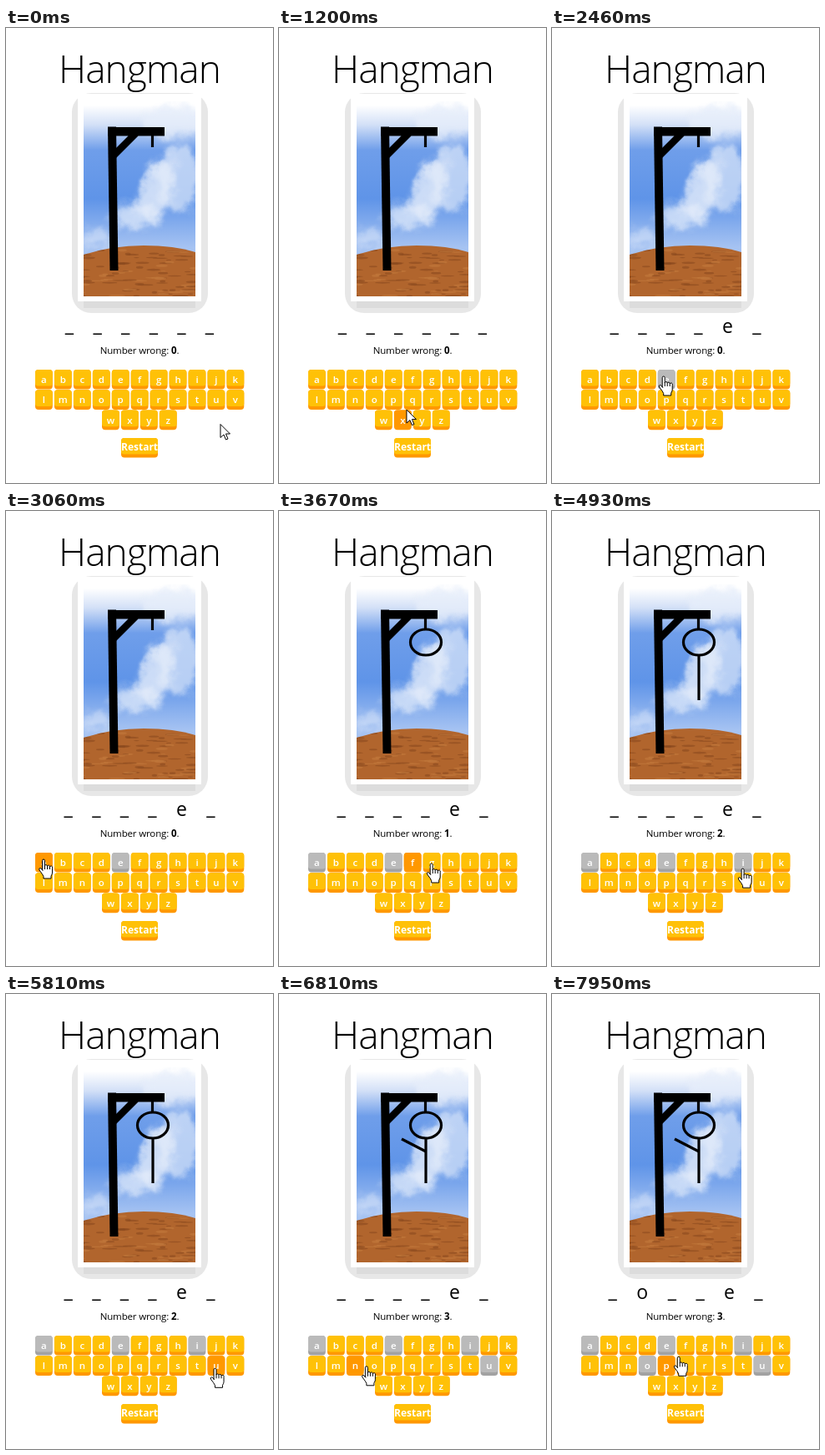
Animation, 320 px wide and 546 px high, one loop 8 s. Source, as an HTML page:

```html
<!DOCTYPE html>
<html lang="en">
<head>
<meta charset="utf-8">
<title>Hangman</title>
<style>
  html, body { margin: 0; width: 100%; height: 100%; overflow: hidden; background: #fff; }
  svg { display: block; font-family: "Open Sans", "Noto Sans", sans-serif; }
  text { text-anchor: middle; white-space: pre; }
  .base { fill: #ff9800; }
  .face { fill: #ffc107; }
  .key text { fill: #fff; font-size: 11.5px; font-weight: 600; }
  .key.restart text { font-size: 12px; font-weight: 700; }
  .hover .face { fill: #ff9800; }
  .used .base { fill: #a2a2a2; }
  .used .face { fill: #bababa; }
  .pointer path { fill: #fff; stroke: #000; }
  .man { fill: none; stroke: #000; stroke-width: 3.2; }
</style>
</head>
<body>
<svg width="320" height="546" viewBox="0 0 320 546">
  <defs>
    <linearGradient id="sky" x1="0" y1="0" x2="0" y2="1">
      <stop offset="0.02" stop-color="#fff"/>
      <stop offset="0.12" stop-color="#d3e0f7"/>
      <stop offset="0.25" stop-color="#6f9eea"/>
      <stop offset="0.5" stop-color="#5f94e8"/>
      <stop offset="0.75" stop-color="#a6c3f2"/>
    </linearGradient>
    <filter id="cloud" x="-30%" y="-30%" width="160%" height="160%" color-interpolation-filters="sRGB">
      <feTurbulence type="fractalNoise" baseFrequency=".05" numOctaves="3" seed="4" result="noise"/>
      <feGaussianBlur in="SourceGraphic" stdDeviation="4"/>
      <feDisplacementMap in2="noise" scale="22" xChannelSelector="R" yChannelSelector="G"/>
    </filter>
    <clipPath id="photo"><rect x="93" y="88" width="134" height="234"/></clipPath>
    <clipPath id="hill"><path d="M93 272Q128 261 165 261T227 269V322H93Z"/></clipPath>
  </defs>
  <text x="160" y="65.5" font-size="46" font-weight="300" letter-spacing="-1">Hangman</text>
  <rect x="79" y="78" width="163" height="264" rx="23" fill="#e7e7e7"/>
  <rect x="93" y="328" width="134" height="8" fill="#dcdcdc"/>
  <rect x="86" y="79" width="148" height="249" fill="#fff"/>
  <g clip-path="url(#photo)">
    <rect x="93" y="88" width="134" height="234" fill="url(#sky)"/>
    <g filter="url(#cloud)" fill="#e6eefb">
      <ellipse cx="205" cy="112" rx="42" ry="18" opacity=".8"/>
      <ellipse cx="207" cy="180" rx="27" ry="40" opacity=".65"/>
      <ellipse cx="180" cy="195" rx="18" ry="40" transform="rotate(24 180 195)" opacity=".8"/>
      <ellipse cx="158" cy="226" rx="30" ry="16" opacity=".7"/>
      <ellipse cx="108" cy="252" rx="20" ry="10" opacity=".5"/>
    </g>
    <g id="soil" clip-path="url(#hill)"><rect x="93" y="258" width="134" height="64" fill="#b1652d"/></g>
  </g>
  <path d="M122 118.5H132L134.500 291H124.500Z"/>
  <path d="M122 119H190V129.500H122ZM130 158V146L147 129H159Z"/>
  <path class="man" d="M175.500 128V143"/>
  <ellipse class="man part" cx="176" cy="157.500" rx="18.500" ry="15.500"/>
  <path class="man part" d="M176 173V227"/>
  <path class="man part" d="M147 174L176 189"/>
  <g id="word" font-size="23"></g>
  <text x="160" y="391" font-size="11.500" letter-spacing="-.15">Number wrong: <tspan id="wrong" font-weight="700">0</tspan>.</text>
  <g id="keys"></g>
  <g class="pointer" id="arrow"><path d="M0 .5v16l4-3.500 2.500 6 2.500-1-2.500-6h5z"/></g>
  <g class="pointer" id="hand">
    <path d="M-1.500 13V1.500a1.500 1.500 0 0 1 3 0V7.500a1.600 1.600 0 0 1 3 .5a1.600 1.600 0 0 1 3 1a1.500 1.500 0 0 1 3 1.200V16q0 2-1.500 4v3h-9v-2.500q-1-2.500-5-7.500q-1-2.500 1-2.500q1.200 0 3 3zM1.500 7v5M4.500 8v4M7.500 9v3"/>
  </g>
</svg>
<script>
const LOOP = 8000, STEP = 120, KEY_W = 20.8, KEY_H = 23.6, HAND_FROM = 1320;
const $ = id => document.getElementById(id);

const clicks = { e: 2070, a: 3310, i: 4550, u: 6190, o: 7210 };
const answer = "_o__e_";
const glyphWidth = { _: 10, e: 12.6, o: 14.1 }, gap = 23.6;

function keyMarkup({ x, y, label, w = KEY_W, textY = 16, cls = "" }) {
  return `<g class="key ${cls}"><rect class="base" x="${x}" y="${y}" width="${w}" height="${KEY_H}" rx="4"/>
    <rect class="face" x="${x}" y="${y}" width="${w}" height="${KEY_H - 4}" rx="3.5"/>
    <text x="${x + w / 2}" y="${y + textY}">${label}</text></g>`;
}

const keys = [..."abcdefghijklmnopqrstuvwxyz"].map((label, i) => {
  const row = Math.floor(i / 11);
  return { label, x: (row < 2 ? 35 : 115) + i % 11 * 22.95, y: 410 + row * 24.3 };
});
const restart = { x: 138, y: 492, label: "Restart", w: 44, textY: 15, cls: "restart" };
$("keys").innerHTML = [...keys, restart].map(keyMarkup).join("");
keys.forEach((k, i) => k.node = $("keys").children[i]);

// Pointer glides: start, end, key reached, offset inside that key
const glide = (start, end, label, dx = 10, dy = 8) => {
  const key = keys.find(k => k.label === label);
  return { start, end, x: key.x + dx, y: key.y + dy };
};
const home = { start: 0, end: 0, x: 257, y: 475 };
const glides = [
  glide(0, 840, "x", 14, 16), glide(840, 1200, "x", 15, -1), glide(1200, 1680, "e", 14),
  glide(2340, 3060, "a"), glide(3190, 3670, "g", 10, 13), glide(3670, 4030, "j", 2),
  glide(4030, 4270, "i", 10, 6), glide(4810, 5050, "t"), glide(5070, 5310, "u"),
  glide(5330, 5810, "u", 9, 15), glide(6210, 6690, "n", 17, 13), glide(6690, 6930, "o", 8, 12),
  glide(7340, 7700, "p", 12), glide(7830, 7950, "q", 2, 1)
];

// Soil streaks
let seed = 7;
const random = () => (seed = seed * 16807 % 2147483647) / 2147483647;
for (let i = 0; i < 90; i++) {
  const x = 90 + random() * 138, y = 262 + random() * 60;
  $("soil").innerHTML += `<ellipse cx="${x}" cy="${y}" rx="${3 + random() * 7}" ry="${0.6 + random()}"
    fill="${random() < 0.7 ? "#8b4a1f" : "#c47a3c"}" opacity=".6"/>`;
}

const smooth = f => f * f * (3 - 2 * f);
const lastStarted = t => glides.findLastIndex(g => g.start <= t);

function pointerAt(t) {
  const i = lastStarted(t);
  if (i < 0) return home;
  const to = glides[i], from = glides[i - 1] || home;
  const f = smooth(Math.min(1, (t - to.start) / (to.end - to.start)));
  return { x: from.x + (to.x - from.x) * f, y: from.y + (to.y - from.y) * f };
}

function drawWord(t) {
  const shown = [...answer].map(c => t >= clicks[c] ? c : "_");
  let x = 160 - (shown.reduce((sum, c) => sum + glyphWidth[c], 0) + gap * 5) / 2;
  $("word").innerHTML = shown.map(c => {
    const center = x + glyphWidth[c] / 2;
    x += glyphWidth[c] + gap;
    return `<text x="${center}" y="${c === "_" ? 364 : 365.5}">${c}</text>`;
  }).join("");
}

const show = (node, on) => node.setAttribute("visibility", on ? "visible" : "hidden");

function draw(t) {
  const { start } = glides[lastStarted(t)];
  const now = start + Math.floor((t - start) / STEP) * STEP;
  const tip = pointerAt(now), trail = pointerAt(now - STEP); // hover lags one step
  for (const k of keys) {
    const over = trail.x >= k.x && trail.x < k.x + KEY_W && trail.y >= k.y && trail.y < k.y + KEY_H;
    k.node.setAttribute("class", "key " + (t >= clicks[k.label] ? "used" : over ? "hover" : ""));
  }
  const wrong = Object.keys(clicks).filter(c => t >= clicks[c] && !answer.includes(c)).length;
  $("wrong").textContent = wrong;
  document.querySelectorAll(".part").forEach((p, i) => show(p, i < wrong));
  drawWord(t);
  show($("arrow"), now < HAND_FROM);
  show($("hand"), now >= HAND_FROM);
  for (const id of ["arrow", "hand"]) $(id).setAttribute("transform", `translate(${tip.x} ${tip.y})`);
}

const began = performance.now();
function tick() {
  draw((performance.now() - began) % LOOP);
  requestAnimationFrame(tick);
}
tick();
</script>
</body>
</html>
```
